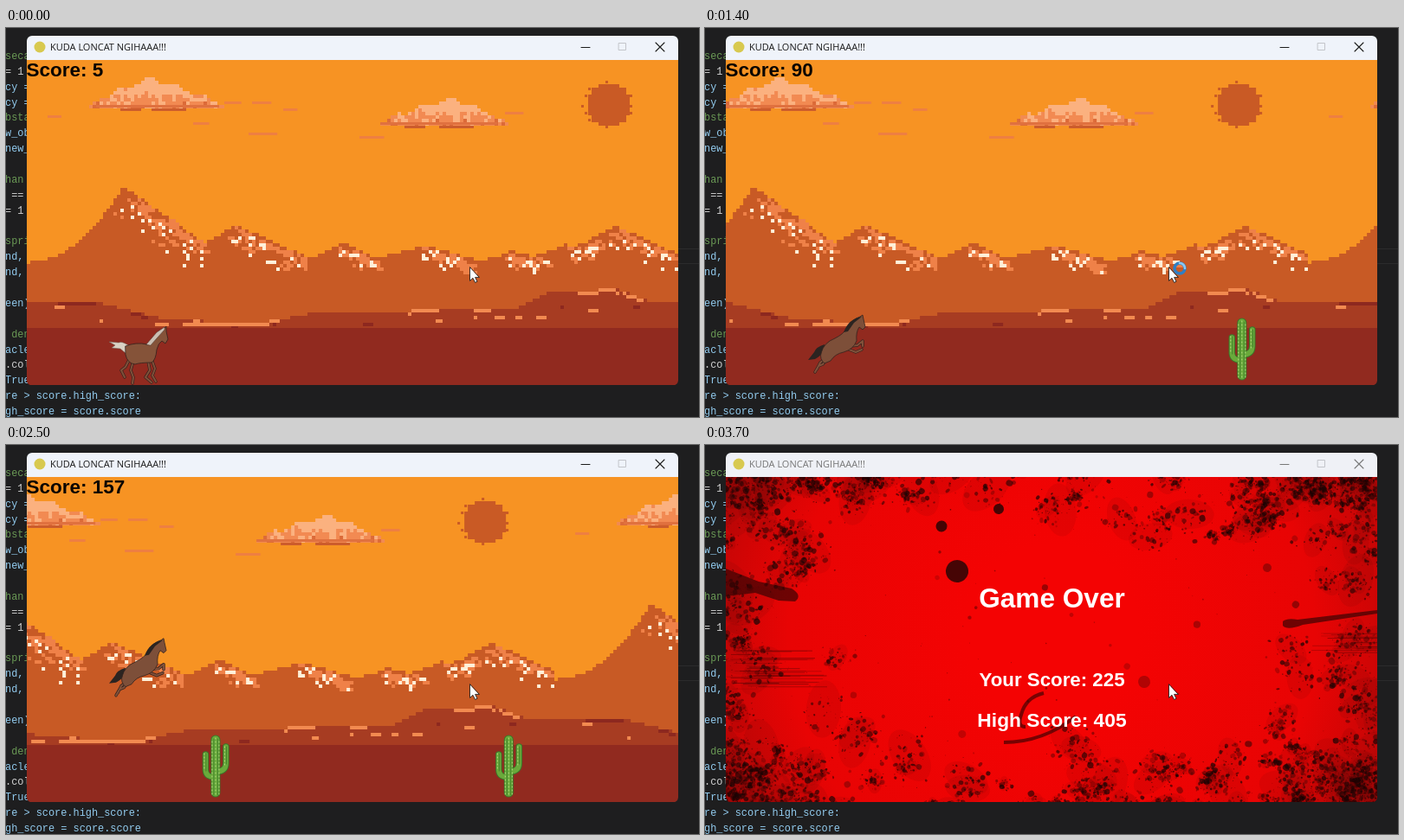
An HTML page with a canvas that plays this animation: 800 by 450 pixels, repeating every 3.8 s.

```html
<!DOCTYPE html>
<html lang="id">
<head>
<meta charset="utf-8">
<title>KUDA LONCAT NGIHAAA!!!</title>
<style>
html, body { margin: 0; width: 100%; height: 100%; overflow: hidden; background: #1e1e1f; }
canvas { display: block; }
</style>
</head>
<body>
<canvas id="stage" width="800" height="450"></canvas>
<script>
const LEFT = 24, TOP = 37, W = 752, H = 376, CELL = 4, GROUND = 347;
const ctx = document.getElementById('stage').getContext('2d');

function randomizer(seed) {
  return () => (seed = (seed * 16807) % 2147483647) / 2147483647;
}

// A layer the size of the game area, drawn in stage coordinates.
function layer(paint) {
  const canvas = document.createElement('canvas');
  canvas.width = W;
  canvas.height = H;
  const g = canvas.getContext('2d');
  g.translate(-LEFT, -TOP);
  paint(g);
  return canvas;
}

const PLAIN_Y = 272;
// summit x, summit y, reach to the left, reach to the right
const PEAKS = [[136,184,110,132], [265,228,120,100], [388,249,70,52], [485,252,120,70], [583,259,60,60],
  [647,251,90,50], [703,229,130,98]];

// Hollow western flanks, nearly straight eastern ones.
function ridge(x) {
  return Math.min(PLAIN_Y, ...PEAKS.map(([px, top, left, right]) => {
    const near = Math.max(0, 1 - (x < px ? (px - x) / left : (x - px) / right));
    return PLAIN_Y - (PLAIN_Y - top) * near ** (x < px ? 2 : 1.1);
  }));
}

const HILLS = [[24,316], [108,319], [185,338], [290,343], [352,331], [590,325], [625,307], [705,303], [740,316], [776,316]];

function hills(x) {
  const i = Math.max(1, HILLS.findIndex(p => p[0] >= x));
  const [x0, y0] = HILLS[i - 1], [x1, y1] = HILLS[i];
  return y0 + (y1 - y0) * (x - x0) / (x1 - x0);
}

const scenery = layer(g => {
  const rnd = randomizer(77);
  const snap = (v, o) => o + Math.floor((v - o) / CELL) * CELL;
  const block = (x, y, color, w = CELL, h = CELL) => {
    g.fillStyle = color;
    g.fillRect(snap(x, LEFT), snap(y, TOP), w, h);
  };
  const terrain = (top, color) => {
    for (let x = LEFT; x < LEFT + W; x += CELL) block(x, top(x + 2) + 1, color, CELL, 170);
  };
  const cloud = (x0, peak, x1, base, tall) => {
    for (let x = x0; x < x1; x += CELL) {
      const near = x < peak ? (x - x0) / (peak - x0) : (x1 - x) / (x1 - peak);
      const height = tall * near ** .8 + 2 * Math.sin(x / 5);
      for (let y = base; y > base - height; y -= CELL) {
        const shade = 1 - (base - y) / tall + (rnd() - .5) * .7;
        block(x, y, shade > 1.15 ? '#dc6a38' : shade > .72 ? '#f28a52' : '#fbb17f');
      }
    }
    block(x0 + 6, base, '#e0713f', x1 - x0 - 14, 3);
    block(x0 + 35, base + CELL, '#cc5c2c', 24, 3);
    block(x0 + 72, base + CELL, '#cc5c2c', 40, 3);
  };

  g.fillStyle = '#f79323';
  g.fillRect(LEFT, TOP, W, H);
  for (const [x, y] of [[50,104], [218,111], [255,87], [285,85], [320,94], [280,124], [410,125], [576,98]])
    block(x, y, '#ee7f42', 16 + rnd() * 20, 3);
  cloud(98, 164, 254, 90, 33);
  cloud(428, 511, 577, 109, 29);

  const sunEdge = a => block(695 + 28 * Math.cos(a), 89 + 25 * Math.sin(a), '#c95a25', 3, 3);
  for (let x = 667; x < 726; x += CELL)
    for (let y = 63; y < 117; y += CELL)
      if (Math.hypot(snap(x, LEFT) + 2 - 696, snap(y, TOP) + 2 - 89) < 26) block(x, y, '#c95a25');
  for (let a = 0; a < 16; a++) sunEdge(a * Math.PI / 8);

  terrain(ridge, '#c85a25');
  for (const [px, top, left, right] of PEAKS) {
    const depth = (PLAIN_Y - top) * .32 + 10;
    const slope = () => px + (rnd() * .95 - .08) * right * .85;
    for (let i = 0; i < right * .28; i++) {
      const x = slope(), y = ridge(x) + 3 + rnd() * rnd() * depth;
      block(x, y, '#ef8148', rnd() < .5 ? 4 : 8);
      block(x + 6, y + 4, '#ef8148', rnd() < .5 ? 4 : 8);
    }
    for (let i = 0; i < right * .16 + 2; i++) {
      const x = slope();
      block(x, ridge(x) + 5 + rnd() * depth * .9, '#fff0d9');
    }
  }

  terrain(hills, '#a73c22');
  for (let x = LEFT; x < LEFT + W - 40;) {
    const run = 8 + rnd() * 36, kind = rnd();
    if (kind < .6)
      for (let d = 0; d < run; d += CELL) block(x + d, hills(x + d + 2) + 1, kind < .12 ? '#8d281f' : '#f28a50');
    x += run + 6;
  }
  for (let i = 0; i < 24; i++) {
    const x = LEFT + rnd() * (W - 16), y = hills(x) + 6;
    block(x, y + rnd() * (342 - y), i % 4 ? '#f28a50' : '#8d281f', 4 + 4 * Math.floor(rnd() * 3));
  }
  g.fillStyle = '#912a1f';
  g.fillRect(LEFT, GROUND, W, H);
});

const gameOver = layer(g => {
  const rnd = randomizer(4321);
  const spread = () => rnd() + rnd() + rnd() - 1.5;
  const glow = g.createRadialGradient(400, 215, 100, 400, 225, 440);
  glow.addColorStop(0, '#f40303');
  glow.addColorStop(.6, '#e80404');
  glow.addColorStop(1, '#b80606');
  g.fillStyle = glow;
  g.fillRect(LEFT, TOP, W, H);
  const blot = (x, y, rx, ry, alpha) => {
    g.fillStyle = `rgba(28,5,5,${alpha})`;
    g.beginPath();
    g.ellipse(x, y, rx, ry, rnd() * 3, 0, 7);
    g.fill();
  };
  // Clusters of specks hug the edges and thicken towards the corners.
  for (let i = 0; i < 230; i++) {
    const end = .5 * rnd() ** 1.5, along = rnd() < .5 ? end : 1 - end;
    const inset = rnd() ** 2 * (.09 + .16 * rnd()), deep = rnd() < .5 ? inset : 1 - inset;
    const [u, v] = i % 5 < 3 ? [along, deep * 1.04 - .02] : [deep, along];
    const x = LEFT + u * W, y = TOP + v * H, size = 8 + rnd() * 26;
    blot(x, y, size, size * .6, .07);
    for (let k = 0; k < 42; k++) {
      const r = .4 + rnd() ** 3 * 3.2;
      blot(x + spread() * size, y + spread() * size * .8, r, r * (.4 + rnd() * .8), .2 + rnd() * .55);
    }
  }
  for (let i = 0; i < 120; i++) {
    const r = .5 + rnd() ** 4 * 4;
    blot(LEFT + rnd() * W, TOP + rnd() * H, r, r, .15 + rnd() * .3);
  }
  for (let i = 0; i < 50; i++) {
    const x = i % 3 ? LEFT + rnd() * 40 : 700 + rnd() * 60, y = i % 3 ? 228 + rnd() * 55 : 215 + rnd() * 25;
    g.fillStyle = `rgba(50,5,5,${.1 + rnd() * .35})`;
    g.fillRect(x, y, 20 + rnd() * 80, 1);
  }
  for (const [x, y, r, a] of [[291,146,13,.8], [273,94,6.5,.8], [339,74,6,.8], [507,274,7,.3], [649,142,5,.35]])
    blot(x, y, r, r, a);
  g.fillStyle = 'rgba(45,4,4,.65)';
  g.fill(new Path2D('M24 143L62 158L100 166Q113 174 104 181L85 180L58 171L24 175Z'));
  g.fill(new Path2D('M667 204Q672 200 684 202L776 191V195L690 208Q672 215 667 209Z'));
  g.strokeStyle = 'rgba(55,3,3,.65)';
  g.lineWidth = 4;
  g.stroke(new Path2D('M391 287Q370 292 365 312Q360 326 370 326M345 344Q390 344 428 314'));
});

function shape(d, fill, stroke, width = 1) {
  const path = new Path2D(d);
  if (fill) { ctx.fillStyle = fill; ctx.fill(path); }
  if (stroke) { ctx.strokeStyle = stroke; ctx.lineWidth = width; ctx.stroke(path); }
}

function limbs(d) {
  shape(d, null, '#33231d', 3.4);
  shape(d, null, '#80503a', 2);
}

function text(str, x, y, font, color, align = 'left') {
  ctx.font = font;
  ctx.fillStyle = color;
  ctx.textAlign = align;
  ctx.fillText(str, x, y);
}

const BOLD = 'px "Liberation Sans", Arial, sans-serif';

// One entry per line; # marks a comment.
const CODE = ['#secara', '= 1', 'cy =', 'cy =', '#bstac', 'w_obs', 'new_o', '', '#han s', ' == ', '= 1', '',
  '#sprit', 'nd, ', 'nd, ', '', 'een)', '', '# deng', 'acle', '.coll', 'True', 're > score.high_score:',
  'gh_score = score.score'];

function editor() {
  ctx.fillStyle = '#1e1e1f';
  ctx.fillRect(0, 0, 800, 450);
  ctx.fillStyle = '#2b2b2c';
  ctx.fillRect(776, 255, 24, 1);
  ctx.fillRect(776, 272, 24, 1);
  CODE.forEach((line, row) => {
    const color = line[0] === '#' ? '#6a9955' : /^\w/.test(line) ? '#92cbee' : '#d0d0d0';
    text(line.replace('#', ''), -1, 36 + row * 17.87, '11.9px "Liberation Mono", monospace', color);
  });
}

function titleBar(active) {
  const ink = active ? '#1b1b1b' : '#777';
  ctx.fillStyle = active ? '#eff3fa' : '#eff1f6';
  ctx.fillRect(LEFT, 9, W, 28);
  ctx.fillStyle = '#d8c94f';
  ctx.beginPath();
  ctx.arc(39, 22, 6.5, 0, 7);
  ctx.fill();
  text('KUDA LONCAT NGIHAAA!!!', 51, 26, '11px "Open Sans", sans-serif', ink);
  shape('M664 22.5H674M750 17L760 27M760 17L750 27', null, ink, 1.1);
  shape('M707.5 17.5H715.5V25.5H707.5Z', null, '#c3c5ca');
}

function cactus(x) {
  ctx.save();
  ctx.translate(x, 0);
  const trunk = 'M0 341V402', arms = 'M0 384Q-11 385 -11.5 376V358M0 378Q12 378 12 368V349';
  shape(arms, null, '#3c7429', 7.5);
  shape(trunk, null, '#3c7429', 11);
  shape(arms, null, '#69aa3b', 5.5);
  shape(trunk, null, '#69aa3b', 9);
  shape('M-2 340V405M2.5 340V405M-11 357V377M12.5 349V369', null, '#3f7d2c', .9);
  ctx.setLineDash([1, 3]);
  shape('M0 339V405M-4 343V405M4 343V405M-13 357V377M10.5 349V370', null, '#b4dc83', 1);
  ctx.restore();
}

function runningHorse() {
  shape('M141 367Q134 362 130 364L119 363L126 367L122 370L132 371L138 376Z', '#d9d1c3', '#6d6258', .5);
  limbs('M142 384L138 392L133 396L137 404M147 385L144 396L147 404L146 411M168 383L172 394L169 402L173 409M164 385L166 396L161 404L168 410');
  shape('M138 368Q150 363 163 366L172 358Q176 350 183 347L185 345V351L187 360L184 365L180 362Q176 364 174 372Q173 384 168 387Q155 387 149 389Q140 388 138 378Z',
    '#855339', '#33231d', .8);
  shape('M162 366L174 352L183 346V349L174 359L167 367Z', '#cbbfb3', '#493730', .5);
}

function jumpingHorse(height) {
  ctx.save();
  ctx.translate(0, 120 - height);
  shape('M138 258Q128 261 126 267L119 276L127 275Q133 272 137 266Z', '#2b2421');
  limbs('M141 274L136 281L131 283L127 290M138 275L133 279L129 287M167 260L176 259L182 254L182 260M164 263L174 267L181 264');
  shape('M134 268Q137 256 150 251Q160 246 163 240Q169 229 179 226L182 224L183 229L185 238L182 241L178 238Q174 244 175 254Q171 264 160 267Q150 269 145 277L138 280Q132 275 134 268Z',
    '#7d4f39', '#33231d', .8);
  shape('M160 244Q166 228 181 226L172 233L165 243Z', '#2b2421');
  ctx.restore();
}

const TAKEOFFS = [50.65, 98, 149];

// Everything in the game advances once per score point.
function play(score) {
  const scroll = .94 * (score - 5);
  ctx.drawImage(scenery, LEFT - scroll, TOP);
  ctx.drawImage(scenery, LEFT + W - scroll, TOP);
  for (let spawn = 60; spawn <= score; spawn += 60) cactus(789 - 5.64 * (score - spawn));
  const takeoff = TAKEOFFS.find(s => score > s && score < s + 40);
  if (takeoff) {
    const n = score - takeoff;
    jumpingHorse(.94 * (20 * n - n * n / 2));
  } else runningHorse();
  text('Score: ' + score, 23.5, 56, 'bold 22.5' + BOLD, '#0a0502');
}

function finish() {
  ctx.drawImage(gameOver, LEFT, TOP);
  text('Game Over', 400.5, 188, 'bold 31.6' + BOLD, '#fff', 'center');
  text('Your Score: 225', 400.5, 279, 'bold 22.3' + BOLD, '#fff', 'center');
  text('High Score: 405', 400.5, 325.5, 'bold 22.8' + BOLD, '#fff', 'center');
}

function pointer(busy) {
  if (busy) {
    shape('M554 278A6 6 0 1 1 542 278A6 6 0 1 1 554 278', null, '#2f7fc4', 3.5);
    shape('M548 272A6 6 0 0 1 554 278', null, '#8cc8f0', 2.5);
  }
  shape('M535.5 277V292.5L539 289.3L541.6 294.5L544 293.3L541.6 288.4H546Z', '#fff', '#222', .9);
}

const start = performance.now();

function frame() {
  const step = Math.floor((performance.now() - start) % 3800 / 100);
  const over = step === 37;
  editor();
  ctx.save();
  ctx.lineCap = ctx.lineJoin = 'round';
  ctx.beginPath();
  ctx.roundRect(LEFT, 9, W, 404.5, 6);
  ctx.clip();
  titleBar(!over);
  if (over) finish();
  else play(Math.round(4.96 + 6.074 * step));
  pointer(step > 12 && step < 16);
  ctx.restore();
  requestAnimationFrame(frame);
}
frame();
</script>
</body>
</html>
```
